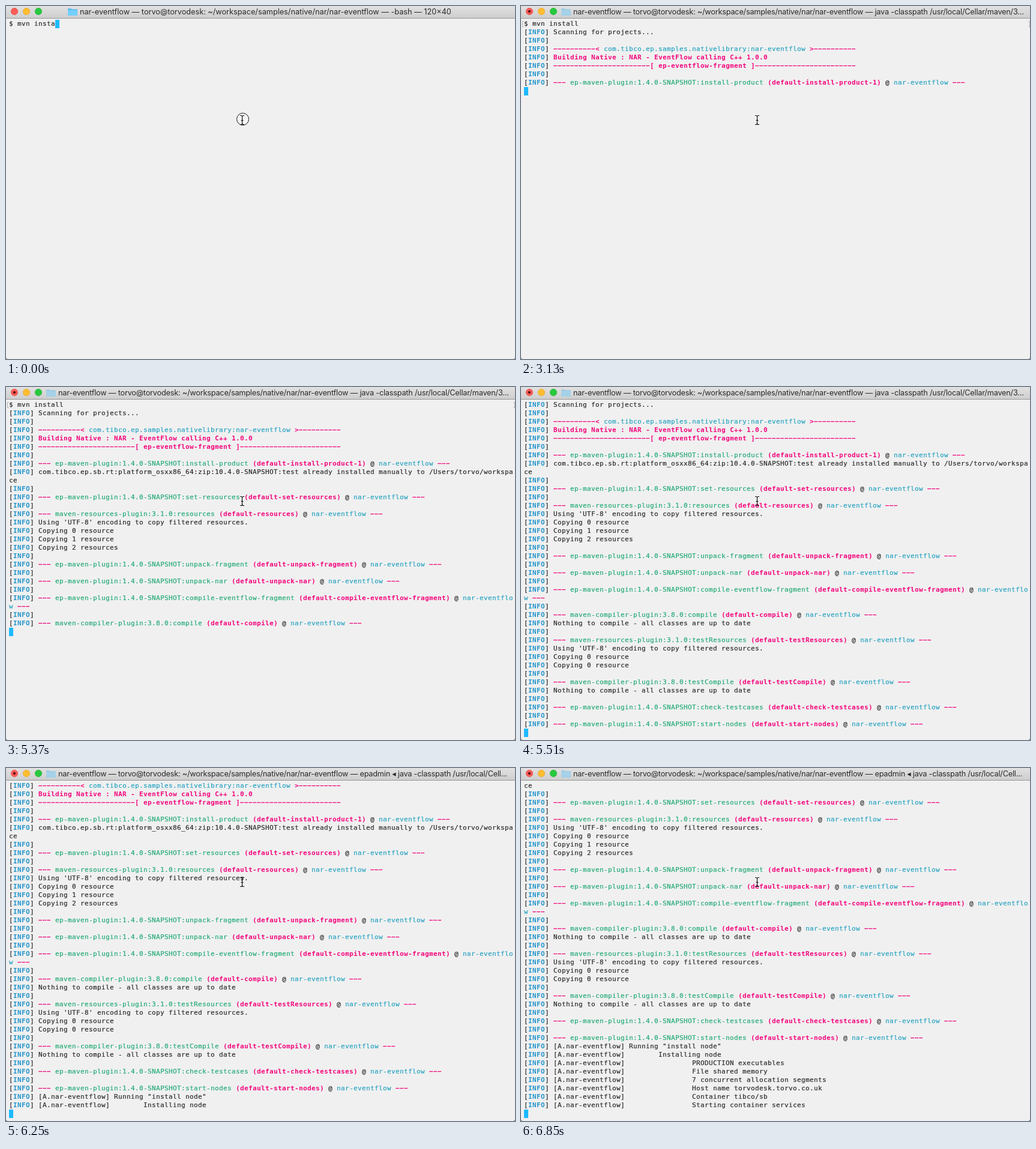
An HTML page that plays this animation: 848x588 px, repeating every 8000 ms.

```html
<!DOCTYPE html>
<html lang="en">
<head>
<meta charset="utf-8">
<title>Terminal build</title>
<style>
html, body { margin: 0; width: 100%; height: 100%; overflow: hidden; background: #f0f0f0; }
#bar { position: absolute; left: 0; top: 0; width: 848px; height: 20px;
  background: linear-gradient(#e2e1e2, #cfcecf); border-bottom: 1px solid #979797; }
#title { position: absolute; top: 0; white-space: pre;
  font: 12.7px/19px Inter, sans-serif; color: #2a2a2a; }
#title.tight { letter-spacing: -.2px; }
#term { position: absolute; left: 5px; top: 23px; width: 843px; height: 565px; margin: 0; overflow: hidden;
  font: 11px/14px "DejaVu Sans Mono", monospace; letter-spacing: calc(7px - 1ch);
  color: #2b2b2b; -webkit-text-stroke: .2px; }
#term div { height: 14px; }
span.i, span.m { font-weight: bold; -webkit-text-stroke: 0; }
span.i { color: #2495cb; }
span.m { color: #f4057c; }
span.g { color: #22aa76; }
span.c { color: #27a3c1; }
#cursor { display: inline-block; width: 7px; height: 14px; vertical-align: top; background: #1dbaff; }
svg { position: absolute; left: 0; top: 0; }
</style>
</head>
<body>
<div id="bar"></div>
<div id="title"></div>
<pre id="term"></pre>
<svg width="848" height="588" fill="none">
  <g stroke-width=".6">
    <circle cx="14" cy="9" r="5.7" fill="#fc5b57" stroke="#e2463f"/>
    <circle cx="34" cy="9" r="5.7" fill="#fdbd2f" stroke="#e0a028"/>
    <circle cx="54" cy="9" r="5.7" fill="#28c840" stroke="#1dad2b"/>
  </g>
  <circle id="busy" cx="14" cy="9" r="2.1" fill="#4d0000"/>
  <g id="folder">
    <path d="M0 5q0-1 1-1h4l1.5 1.2H15q1 0 1 1V15q0 1-1 1H1q-1 0-1-1z" fill="#5dbdec"/>
    <path d="M0 7h16v8q0 1-1 1H1q-1 0-1-1z" fill="#74cffa"/>
  </g>
  <path id="marks" d="M4.5 25.5h-2v9h2M845.5 25.5h2v9h-2" stroke="#b0b0b0"/>
  <circle id="ring" cx="394.5" cy="188.5" r="10" fill="#f6f6f6" stroke="#111"/>
  <path id="beam" d="M390 182.5h1.5q2 0 2 2v11q0 2-2 2H390M397 182.5h-1.5q-2 0-2 2v11q0 2 2 2H397M391.5 190.5h4" stroke="#111" stroke-width="1.2"/>
  <path d="M0 584q0 4 4 4H0zM848 584q0 4-4 4h4z" fill="#8c8c8c"/>
</svg>
<script>
const COLS = 120, ROWS = 40, LOOP = 8000;
const $ = id => document.getElementById(id);

// Markup: each "|" starts a run, and the next letter is its style.
const rule = n => '\u2212'.repeat(n);
const info = (s = '') => '|k[|iINFO|k] ' + s;
const goal = (plugin, run) =>
  info(`|m${rule(3)} |g${plugin} |m(default-${run})|k @ |cnar-eventflow |m${rule(3)}`);
const ep = (name, run = name) => goal('ep-maven-plugin:1.4.0-SNAPSHOT:' + name, run);
const node = (indent, s) => info('[A.nar-eventflow]' + ' '.repeat(indent) + s);
const copy = n => info(`Copying ${n} resource${n > 1 ? 's' : ''}`);
const utf = info("Using 'UTF-8' encoding to copy filtered resources.");
const fresh = info('Nothing to compile - all classes are up to date');
const command = '$ mvn install';

function wrap(markup) {
  const out = [''];
  let col = 0;
  for (const run of markup.split('|').slice(1)) {
    let text = run.slice(1);
    while (text) {
      if (col === COLS) { out.push(''); col = 0; }
      const part = text.slice(0, COLS - col);
      out[out.length - 1] += `<span class="${run[0]}">${part.replace(/</g, '&lt;')}</span>`;
      col += part.length;
      text = text.slice(part.length);
    }
  }
  return out;
}

const lines = [
  '|k' + command,
  info('Scanning for projects...'),
  info(),
  info(`|m${rule(10)}< |ccom.tibco.ep.samples.nativelibrary:nar-eventflow|m >${rule(10)}`),
  info('|mBuilding Native : NAR - EventFlow calling C++ 1.0.0'),
  info(`|m${rule(23)}[ ep-eventflow-fragment ]${rule(24)}`),
  info(),
  ep('install-product', 'install-product-1'),
  info('com.tibco.ep.sb.rt:platform_osxx86_64:zip:10.4.0-SNAPSHOT:test already installed manually to /Users/torvo/workspace'),
  info(),
  ep('set-resources'),
  info(),
  goal('maven-resources-plugin:3.1.0:resources', 'resources'),
  utf, copy(0), copy(1), copy(2),
  info(),
  ep('unpack-fragment'),
  info(),
  ep('unpack-nar'),
  info(),
  ep('compile-eventflow-fragment'),
  info(),
  goal('maven-compiler-plugin:3.8.0:compile', 'compile'),
  fresh,
  info(),
  goal('maven-resources-plugin:3.1.0:testResources', 'testResources'),
  utf, copy(0), copy(0),
  info(),
  goal('maven-compiler-plugin:3.8.0:testCompile', 'testCompile'),
  fresh,
  info(),
  ep('check-testcases'),
  info(),
  ep('start-nodes'),
  node(1, 'Running "install node"'),
  node(8, 'Installing node'),
  node(16, 'PRODUCTION executables'),
  node(16, 'File shared memory'),
  node(16, '7 concurrent allocation segments'),
  node(16, 'Host name torvodesk.torvo.co.uk'),
  node(16, 'Container tibco/sb'),
  node(16, 'Starting container services'),
].flatMap(wrap);

const idle = '-bash — 120×40';
const java = 'java -classpath /usr/local/Cellar/maven/3...';
const admin = 'epadmin ◂ java -classpath /usr/local/Cell...';
const shell = 'bash ◂ java -classpath /usr/local/Cellar/m...';

// Start time, finished lines, running program, typed characters
const stages = [
  [0, 0, idle, 11], [150, 0, idle, 12], [300, 0, idle, 13],
  [590, 1, java], [1640, 2, java], [2680, 6, java], [3130, 8, java],
  [5070, 14, java], [5220, 22, java], [5370, 27, java], [5510, 40, java],
  [5660, 42, java], [5810, 42, admin], [6110, 42, shell], [6250, 42, admin],
  [6550, 47, admin], [6850, 48, admin],
];

const show = (id, on) => $(id).setAttribute('visibility', on ? 'visible' : 'hidden');

function render([start, count, program, typed = 0]) {
  const first = Math.max(0, count - ROWS + 1);
  const prompt = command.slice(0, typed) + '<span id="cursor"></span>';
  $('term').innerHTML = [...lines.slice(first, count), prompt]
    .map(row => `<div>${row}</div>`).join('');

  const busy = count > 0, x = busy ? 67 : 103;
  $('title').textContent =
    'nar-eventflow — torvo@torvodesk: ~/workspace/samples/native/nar/nar-eventflow — ' + program;
  $('title').style.left = x + 20 + 'px';
  $('title').classList.toggle('tight', busy);
  $('folder').setAttribute('transform', `translate(${x})`);
  $('folder').setAttribute('opacity', busy ? .5 : 1);
  show('busy', busy);
  show('marks', busy && first === 0);
  show('ring', start === 0);
}

let current;
function tick() {
  const t = performance.now() % LOOP;
  const stage = stages.filter(s => s[0] <= t).pop();
  if (stage !== current) render(current = stage);
  requestAnimationFrame(tick);
}
tick();
</script>
</body>
</html>
```
